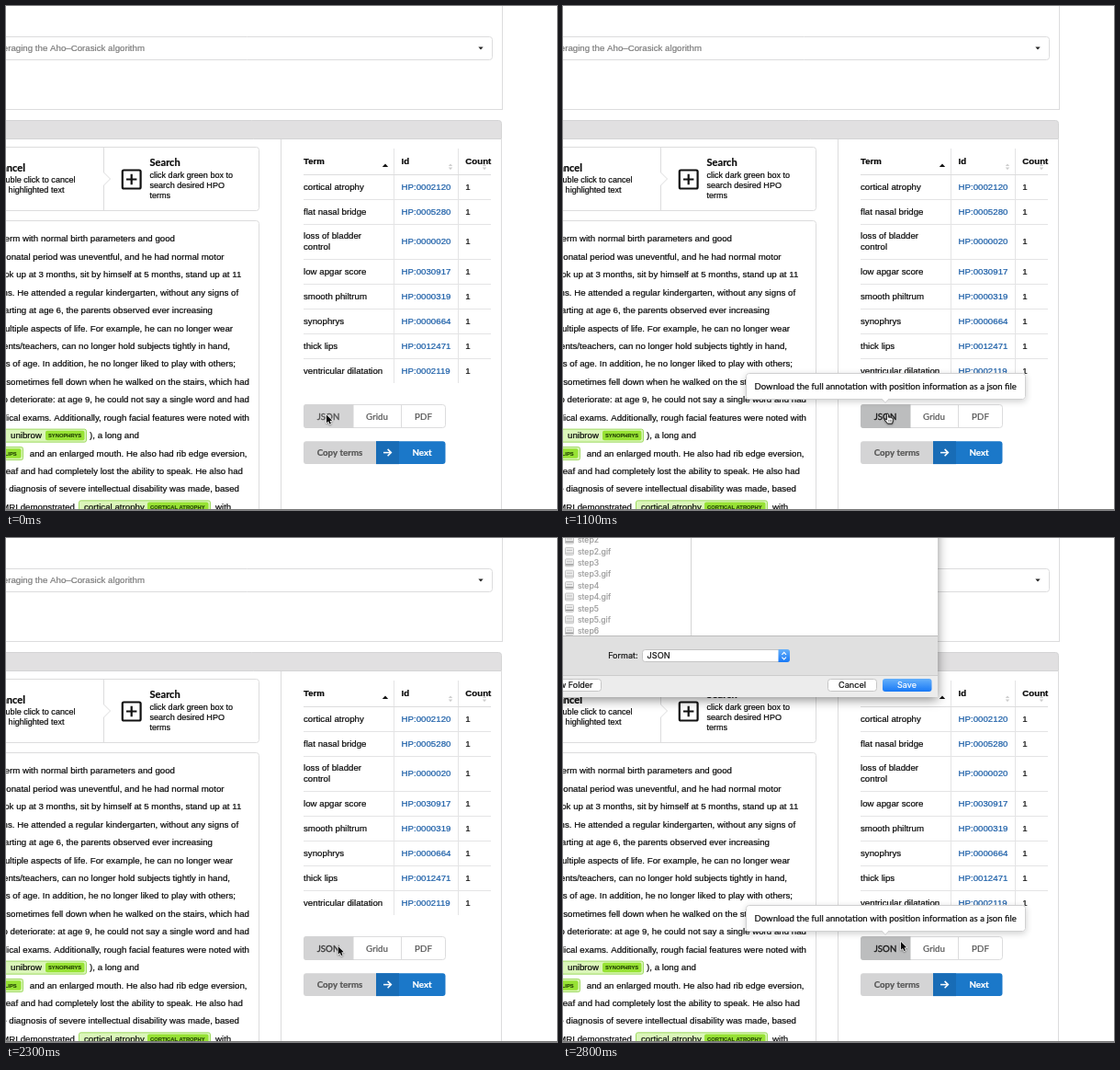
Animation, 600 px wide and 548 px high, one loop 2900 ms. Source, as an HTML page with a canvas:

```html
<!DOCTYPE html>
<html lang="en">
<head>
<meta charset="utf-8">
<title>Annotation download</title>
<style>
html, body { margin: 0; width: 100%; height: 100%; overflow: hidden; background: #fff; }
canvas { display: block; width: 600px; height: 548px; }
</style>
</head>
<body>
<canvas id="stage" width="600" height="548"></canvas>
<script>
const ctx = document.getElementById('stage').getContext('2d');
const LOOP = 2900, STEP = 100;
const SANS = '"Liberation Sans", Arial, sans-serif';
const LATO = 'Lato, sans-serif';
const UI = 'Inter, sans-serif';
const LINE = '#dcdcdd';

// Text is set large and scaled down so that fractional sizes keep their true widths.
// A thin outline gives the strokes the weight of smoothed screen text.
function text(s, x, y, { size = 9.7, color = '#0c0c0c', weight = 400, font = SANS, align = 'left', bold = 0.22 } = {}) {
  ctx.save();
  ctx.translate(x, y);
  ctx.scale(0.1, 0.1);
  ctx.font = `${weight} ${size * 10}px ${font}`;
  ctx.textAlign = align;
  ctx.fillStyle = ctx.strokeStyle = color;
  ctx.lineWidth = bold * 10;
  ctx.lineJoin = 'round';
  ctx.fillText(s, 0, 0);
  ctx.strokeText(s, 0, 0);
  ctx.restore();
}

function rect(x, y, w, h, color) {
  ctx.fillStyle = color;
  ctx.fillRect(x, y, w, h);
}

function box(x, y, w, h, r, fill, stroke) {
  ctx.beginPath();
  ctx.roundRect(x, y, w, h, r);
  if (fill) { ctx.fillStyle = fill; ctx.fill(); }
  if (stroke) { ctx.strokeStyle = stroke; ctx.lineWidth = 1; ctx.stroke(); }
}

function poly(points, fill, stroke, width = 1, close = true) {
  ctx.beginPath();
  points.forEach(([x, y], i) => i ? ctx.lineTo(x, y) : ctx.moveTo(x, y));
  if (close) ctx.closePath();
  if (fill) { ctx.fillStyle = fill; ctx.fill(); }
  if (stroke) { ctx.strokeStyle = stroke; ctx.lineWidth = width; ctx.stroke(); }
}

// Triangle with its base at y and its tip at y + h.
const tri = (x, y, half, h, color) => poly([[x - half, y], [x + half, y], [x, y + h]], color);

function blueFade(y, h) {
  const g = ctx.createLinearGradient(0, y, 0, y + h);
  g.addColorStop(0, '#66b0fa');
  g.addColorStop(1, '#1879f6');
  return g;
}

function shadow(color, blur, y) {
  ctx.shadowColor = color;
  ctx.shadowBlur = blur;
  ctx.shadowOffsetY = y;
}

const clamp = v => Math.max(0, Math.min(1, v));

function drawFrame() {
  rect(0, 0, 600, 548, '#fff');
  rect(0, 112, 541, 1, LINE);
  rect(540, 0, 1, 113, LINE);
  box(-9.5, 33.5, 539, 25, 3, '#fff', LINE);
  text('leveraging the Aho–Corasick algorithm', 151, 49.2, { color: '#7c7c7c', align: 'right' });
  tri(517, 44.6, 2.6, 3, '#222');

  box(-9.5, 124.5, 549, 20, [0, 3, 0, 0], '#e1e0e1', '#d4d4d5');
  rect(299, 145, 1, 403, LINE);
  rect(539, 145, 1, 403, LINE);
}

function drawSteps() {
  box(-9.5, 153.5, 285, 69, 3, '#fff', LINE);
  rect(106, 154, 1, 69, LINE);
  rect(105.5, 181, 2, 14, '#fff');
  poly([[106.5, 181], [113.5, 188], [106.5, 195]], null, LINE, 1, false);

  const note = { size: 9.05 };
  const title = { size: 11.1, weight: 700, font: LATO };
  text('Cancel', 21, 179.6, { ...title, align: 'right' });
  text('Double click to cancel', -12, 192, note);
  text('the highlighted text', -12.5, 203, note);

  text('Search', 156.5, 174, title);
  ['click dark green box to', 'search desired HPO', 'terms']
    .forEach((s, i) => text(s, 156.5, 187 + i * 11, note));

  ctx.beginPath();
  ctx.roundRect(126.8, 178.5, 19.8, 20, 1.5);
  ctx.moveTo(131, 188.5); ctx.lineTo(142.4, 188.5);
  ctx.moveTo(136.7, 182.8); ctx.lineTo(136.7, 194.2);
  ctx.strokeStyle = '#111';
  ctx.lineWidth = 2.2;
  ctx.stroke();
}

const PROSE = [
  ['He was born at term with normal birth parameters and good', 184],
  ['The neonatal period was uneventful, and he had normal motor', 237.5],
  ['took up at 3 months, sit by himself at 5 months, stand up at 11', 256.3],
  ['months. He attended a regular kindergarten, without any signs of', 253.2],
  ['starting at age 6, the parents observed ever increasing', 225],
  ['multiple aspects of life. For example, he can no longer wear', 247],
  ['parents/teachers, can no longer hold subjects tightly in hand,', 244],
  ['years of age. In addition, he no longer liked to play with others;', 250],
  ['he sometimes fell down when he walked on the stairs, which had', 265],
  ['to deteriorate: at age 9, he could not say a single word and had', 265],
  ['medical exams. Additionally, rough facial features were noted with', 265],
  ['), a long and', 145],
  ['and an enlarged mouth. He also had rib edge eversion,', 262.5],
  ['deaf and had completely lost the ability to speak. He also had', 258],
  ['the diagnosis of severe intellectual disability was made, based', 254],
  ['MRI demonstrated', 75]
];
const lineY = i => 256.4 + i * 19.43;

function label(row, x, right, word, wordX, tagX, tag, tagTextX) {
  const y = lineY(row) - 10.5;
  box(x + 0.5, y + 0.5, right - x - 1, 14, 2, '#dbf6ba', '#9fda62');
  text(word, wordX, lineY(row));
  box(tagX, y + 2.2, right - 2.5 - tagX, 10.5, 2, '#97e234');
  text(tag, tagTextX, y + 9.5, { size: 5.8, weight: 700, color: '#1f3d00', bold: 0.1 });
}

function drawProse() {
  box(-9.5, 233.5, 285, 340, 3, '#fff', LINE);
  PROSE.forEach(([s, right], i) => text(s, right, lineY(i), { align: 'right' }));
  label(11, -6, 88, 'unibrow', 5, 43, 'SYNOPHRYS', 46);
  label(12, -60, 19, 'thick lips', -50, -30, 'THICK LIPS', -20.5);
  label(15, 79, 223, 'cortical atrophy', 85, 154, 'CORTICAL ATROPHY', 157);
  text('with', 228, lineY(15));
}

const ROWS = [
  ['cortical atrophy', '0002120', 197],
  ['flat nasal bridge', '0005280', 224],
  ['loss of bladder|control', '0000020', 256],
  ['low apgar score', '0030917', 289],
  ['smooth philtrum', '0000319', 316],
  ['synophrys', '0000664', 343],
  ['thick lips', '0012471', 370],
  ['ventricular dilatation', '0002119', 397]
];

function drawTable() {
  const head = { weight: 700 };
  text('Term', 324, 171.6, head);
  text('Id', 430.5, 171.6, head);
  text('Count', 500.3, 171.6, head);
  tri(413, 175, 3.2, -3.6, '#111');
  for (const x of [484, 521]) {
    tri(x, 174, 2.2, -2.6, '#cdcdcd');
    tri(x, 175.6, 2.2, 2.6, '#cdcdcd');
  }
  rect(422, 155, 1, 255, '#e4e4e5');
  rect(492, 155, 1, 255, '#e4e4e5');
  rect(324, 183, 204, 1, LINE);
  ROWS.forEach(([term, id, y], i) => {
    const parts = term.split('|');
    parts.forEach((s, k) => text(s, 324, y + 3.1 + (k * 2 - parts.length + 1) * 5.8));
    text('HP:' + id, 430.5, y + 3.1, { color: '#185ca6' });
    text('1', 500.3, y + 3.1);
    if (i < ROWS.length - 1) rect(324, y + (parts.length > 1 ? 19 : 13), 204, 1, '#e4e4e5');
  });
}

// Background and text colour of the JSON button.
function jsonLook(t) {
  if (t >= 1800 && t < 2000) return ['#a9a9aa', '#1c1c1c'];
  if (t < 100 || (t >= 2100 && t < 2300)) return ['#d4d4d5', '#555'];
  if (t < 200 || (t >= 2300 && t < 2500)) return ['#d3d3d4', '#3a3a3a'];
  return ['#bcbdbe', '#1c1c1c'];
}

function drawButtons(t) {
  const [bg, ink] = jsonLook(t);
  const mid = { font: LATO, align: 'center', size: 9.75, color: '#555' };
  box(324.5, 433.5, 154, 25, 3, '#fff', LINE);
  box(324, 433, 54.5, 26, [3, 0, 0, 3], bg);
  rect(430, 434, 1, 25, LINE);
  text('JSON', 351, 449.6, { ...mid, color: ink, bold: 0.35 });
  text('Gridu', 404, 449.6, mid);
  text('PDF', 454.5, 449.6, mid);

  box(324, 473.3, 79, 24.8, [3, 0, 0, 3], '#d4d4d5');
  text('Copy terms', 363.5, 489.2, { ...mid, weight: 700 });
  box(403, 473.3, 75.5, 24.8, [0, 3, 3, 0], '#1b78c9');
  rect(403, 473.3, 25, 24.8, '#186cb6');
  text('Next', 453, 489.2, { ...mid, weight: 700, color: '#fff' });
  poly([[411, 485.6], [419, 485.6]], null, '#fff', 1.5, false);
  poly([[415.6, 481.9], [419.4, 485.6], [415.6, 489.3]], null, '#fff', 1.5, false);
}

function tipAlpha(t) {
  if (t < 2100) return clamp((t - 100) / 200);
  return clamp((t - 2400) / 200);
}

function drawTip(t) {
  const alpha = tipAlpha(t);
  if (!alpha) return;
  ctx.save();
  ctx.globalAlpha = alpha;
  ctx.save();
  shadow('rgba(34,36,38,.22)', 7, 2);
  box(199, 399, 305, 29, 3, '#fff');
  ctx.restore();
  box(199.5, 399.5, 304, 28, 3, '#fff', '#d0d0d1');
  poly([[347, 427], [351, 431.5], [355, 427]], '#fff', '#d0d0d1', 1, false);
  text('Download the full annotation with position information as a json file', 351.2, 417.2,
    { font: LATO, size: 9.57, align: 'center' });
  ctx.restore();
}

function drawBar() {
  box(-5, 167, 359.5, 20, [0, 3, 3, 0], 'rgba(0,0,0,.31)');
  ctx.beginPath();
  ctx.arc(148, 168, 9, 0.1, 2.6);
  ctx.strokeStyle = 'rgba(255,255,255,.35)';
  ctx.lineWidth = 1;
  ctx.stroke();
}

function drawFiles() {
  for (let i = 0; i < 9; i++) {
    const y = 2 + i * 12.4;
    const gif = i % 2;
    box(2.5, y - 4, 9, 8, 1, '#ececec', '#c4c4c4');
    rect(4, y - 1.5, 6, 1, '#bdbdbd');
    rect(3, y + 1.5, 8, 1.2, gif ? '#c4c4c4' : '#8a8a8a');
    text('step' + (2 + (i >> 1)) + (gif ? '.gif' : ''), 16, y + 3.1, { font: UI, size: 8.7, color: '#9c9c9c' });
  }
}

function drawSheet(t) {
  const p = clamp((t - 2326) / 290);
  if (!p) return;
  const active = t >= 2600;
  ctx.save();
  ctx.translate(0, Math.round(-173 * (1 - p) ** 2));
  ctx.save();
  shadow(`rgba(0,0,0,${active ? 0.45 : 0.22})`, 11, 3);
  rect(-20, -200, 428, 373, '#ececec');
  ctx.restore();
  rect(0, -200, 408, 306, '#fff');
  rect(139, -200, 1, 306, '#d4d4d4');
  rect(0, 106, 408, 43, '#e0e0e0');
  rect(0, 106, 408, 1, '#bcbcbc');
  rect(0, 149, 408, 1, '#cccccc');
  if (active) drawFiles();

  const ui = { font: UI, size: 9, color: '#111' };
  text('Format:', 81.5, 131, { ...ui, align: 'right' });
  box(86.5, 121.5, 160, 13, 3, '#fff', '#c4c4c4');
  text('JSON', 91.5, 131, { ...ui, size: 9.2 });
  if (active) box(234.5, 121, 12.5, 14, [0, 3, 3, 0], blueFade(121, 14));
  const ink = active ? '#fff' : '#333';
  poly([[238.4, 126.8], [240.7, 124.4], [243, 126.8]], null, ink, 1.1, false);
  poly([[238.4, 129.6], [240.7, 132], [243, 129.6]], null, ink, 1.1, false);

  box(-19.5, 153.5, 61, 13, 3, '#fff', '#c6c6c6');
  text('New Folder', 32.5, 163.2, { ...ui, align: 'right' });
  box(288.5, 153.5, 53, 13, 3, '#fff', '#c6c6c6');
  text('Cancel', 315, 163.2, { ...ui, size: 9.2, align: 'center' });
  if (active) box(348, 153, 53.5, 14, 3, blueFade(153, 14));
  else box(348.5, 153.5, 52.5, 13, 3, '#fff', '#c6c6c6');
  text('Save', 374.5, 163.2, { ...ui, align: 'center', color: active ? '#fff' : '#111' });
  ctx.restore();
}

// Pointer path: time, x, y of its tip.
const PATH = [
  [0, 349, 444.5], [100, 350, 444.5], [500, 357.5, 443], [800, 357.5, 443], [1100, 353.5, 443.5],
  [1900, 353.5, 443.5], [2000, 355, 444], [2100, 355, 444], [2400, 365, 444], [2600, 368, 439], [2900, 368, 439]
];

function pointerAt(t) {
  const i = PATH.findIndex(k => k[0] > t);
  const [t0, x0, y0] = PATH[i - 1], [t1, x1, y1] = PATH[i];
  const p = (t - t0) / (t1 - t0);
  return [x0 + (x1 - x0) * p, y0 + (y1 - y0) * p];
}

function drawPointer(t) {
  ctx.save();
  ctx.translate(...pointerAt(t));
  ctx.scale(0.92, 0.92);
  ctx.lineJoin = 'round';
  shadow('rgba(0,0,0,.3)', 2, 1);
  if (t >= 200 && t < 2000) {
    poly([[-1.2, 0.8], [0, -0.3], [1.2, 0.8], [1.3, 4], [3, 4], [4.6, 4.6], [6.4, 5.4],
      [6.7, 7.5], [5.5, 11.5], [0, 11.5], [-3.8, 7], [-3, 5.8], [-1.2, 7]], '#fff', '#111', 1);
    ctx.shadowColor = 'transparent';
    for (const x of [1.4, 3.1, 4.8]) poly([[x, 7], [x, 9.6]], null, '#333', 0.6, false);
  } else {
    const arrow = [[0, 0], [0, 9.6], [2.2, 7.6], [3.7, 11], [5.4, 10.2], [3.9, 7], [6.8, 6.8]];
    poly(arrow, '#fff', '#fff', 1.5);
    ctx.shadowColor = 'transparent';
    poly(arrow, '#0a0a0a');
  }
  ctx.restore();
}

function drawClick() {
  ctx.beginPath();
  ctx.arc(354.5, 445, 21, 0, Math.PI * 2);
  ctx.strokeStyle = '#1a1a1a';
  ctx.lineWidth = 1.4;
  ctx.stroke();
}

function draw(t) {
  drawFrame();
  drawSteps();
  drawProse();
  drawTable();
  drawButtons(t);
  drawTip(t);
  if (t >= 2100 && t < 2300) drawBar();
  drawSheet(t);
  rect(0, 547, 600, 1, '#777');
  if (t >= 1800 && t < 2000) drawClick();
  drawPointer(t);
}

const start = performance.now();
function tick(now) {
  const t = Math.max(0, now - start) % LOOP;
  draw(Math.floor(t / STEP) * STEP);
  requestAnimationFrame(tick);
}
tick(start);
</script>
</body>
</html>
```
